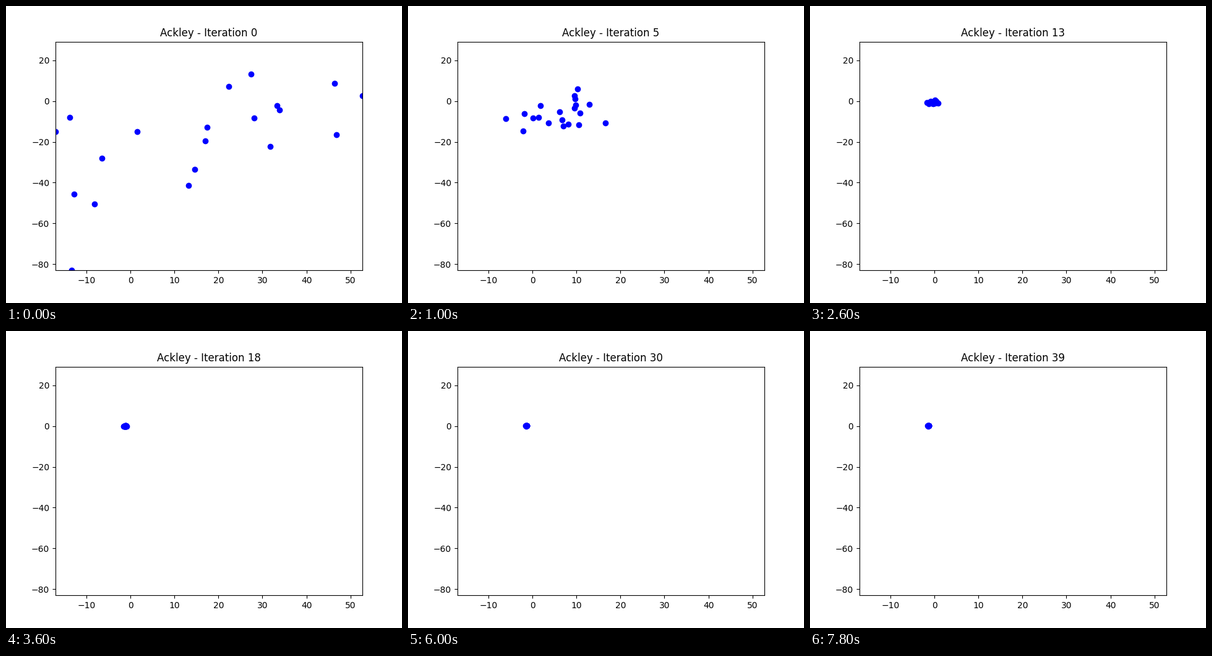
A matplotlib script for the animation above (8000 ms loop, 640 by 480 pixels).

```python
import numpy as np
import matplotlib.pyplot as plt
from matplotlib.animation import FuncAnimation

FRAMES, INTERVAL = 40, 200
XLIM, YLIM = (-17.02, 52.71), (-83.06, 29.23)
OPTIMUM = np.array([-1.38, 0.17])
MIN_SPREAD = 0.05

# starting swarm, from left to right
START = np.array([
    (-17.02, -15), (-13.8, -8), (-13.3, -83.06), (-12.8, -45.6), (-8.2, -50.5),
    (-6.5, -28), (1.5, -15), (13.2, -41.4), (14.6, -33.5), (17, -19.5),
    (17.4, -12.8), (22.3, 7.2), (27.4, 13.3), (28.1, -8.3), (31.8, -22.2),
    (33.3, -2.2), (33.9, -4.3), (46.4, 8.8), (46.8, -16.5), (52.71, 2.7)])


def normalise(pts):
    return (pts - pts.mean(axis=0)) / pts.std(axis=0)


rng = np.random.default_rng(7)
centre0, spread0 = START.mean(axis=0), START.std(axis=0)
first_shape = normalise(START)
late_shape = normalise(rng.normal(size=START.shape))


def positions(n):
    """The swarm shrinks while its centre glides to the optimum."""
    glide = np.exp(-np.array([0.13, 0.2]) * n - np.array([0.0065, 0.004]) * n**2)
    shrink = np.exp(-np.array([0.27, 0.29]) * n)
    mix = min(1, n / 4)
    shape = (1 - mix) * first_shape + mix * late_shape
    centre = OPTIMUM + (centre0 - OPTIMUM) * glide
    return centre + np.maximum(spread0 * shrink, MIN_SPREAD) * shape


fig, ax = plt.subplots(figsize=(6.4, 4.8), dpi=100)
ax.set_xlim(XLIM)
ax.set_ylim(YLIM)
dots = ax.scatter(*START.T, s=36, color="blue", antialiased=False)
title = ax.set_title("")


def update(n):
    dots.set_offsets(positions(n))
    title.set_text(f"Ackley - Iteration {n}")
    return dots, title


anim = FuncAnimation(fig, update, frames=FRAMES, interval=INTERVAL,
                     repeat=True, repeat_delay=0)
plt.show()
```
